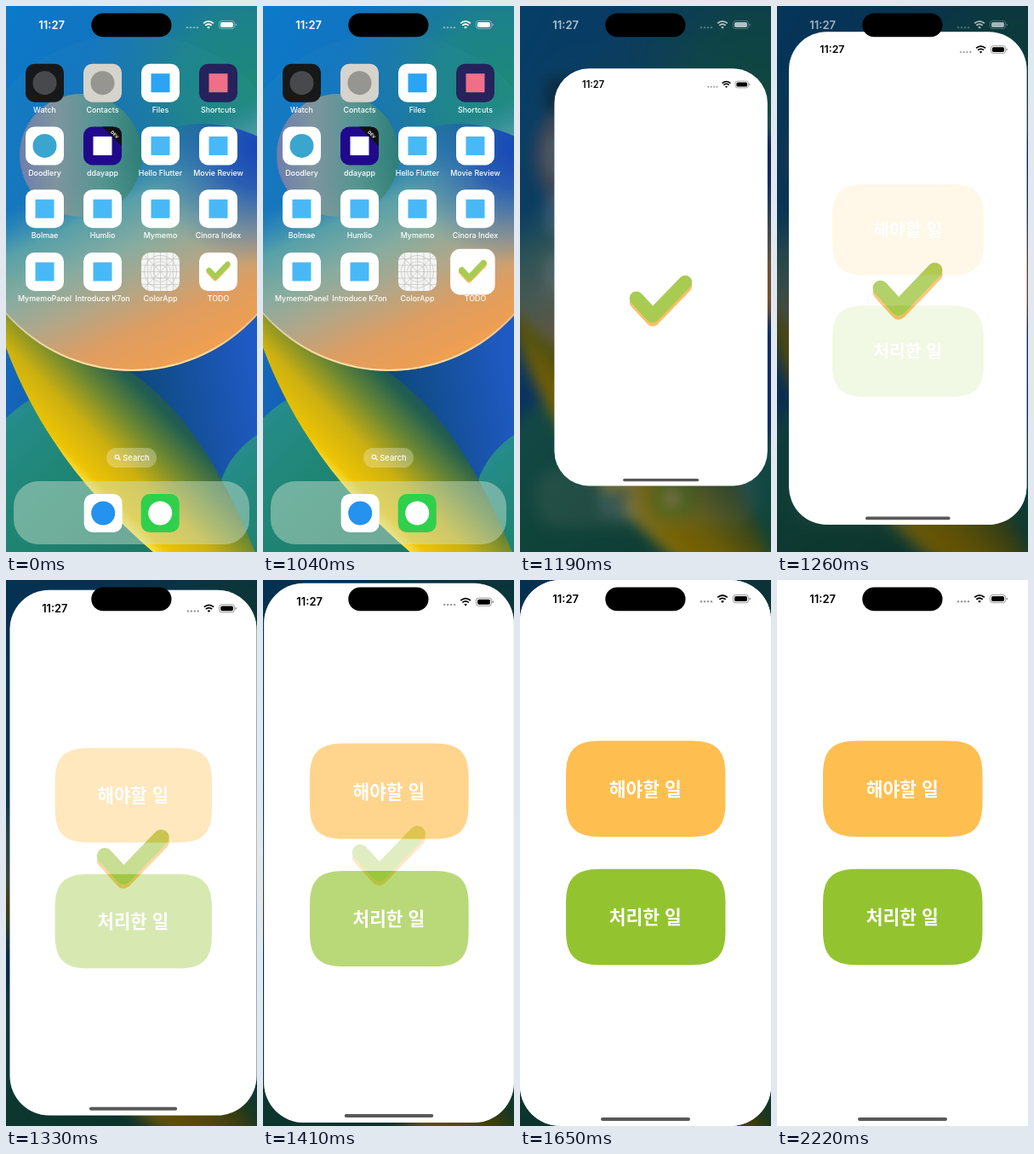
Animation, 295 px wide and 640 px high, one loop 2.44 s. Source, as an HTML page:

```html
<!DOCTYPE html>
<html lang="ko">
<head>
<meta charset="utf-8">
<title>Opening an app</title>
<style>
  html, body { margin: 0; width: 100%; height: 100%; overflow: hidden; background: #000; }
  svg { display: block; width: 100vw; height: 100vh; }
  text { font-family: Inter, sans-serif; text-anchor: middle; }
  .label { font-size: 8.9px; font-weight: 500; fill: #fff; }
  .clock { font-size: 13px; font-weight: 600; fill: currentColor; }
  .button { font: 700 21.5px "Noto Sans CJK KR", "Noto Sans CJK", sans-serif; fill: #fff; }
</style>
</head>
<body>
<svg viewBox="0 0 295 640">
  <defs>
    <linearGradient id="sky" x1="0" y1="0" x2="1" y2="1">
      <stop offset="0" stop-color="#087fd2"/><stop offset=".3" stop-color="#1272bd"/>
      <stop offset=".6" stop-color="#1650b2"/><stop offset="1" stop-color="#0d51b4"/>
    </linearGradient>
    <radialGradient id="moss" gradientUnits="userSpaceOnUse" cx="285" cy="95" r="190">
      <stop offset="0" stop-color="#1d8a79"/><stop offset=".45" stop-color="#1d8783" stop-opacity=".85"/>
      <stop offset="1" stop-color="#1c7fa0" stop-opacity="0"/>
    </radialGradient>
    <linearGradient id="deep" gradientUnits="userSpaceOnUse" x1="160" y1="450" x2="290" y2="425">
      <stop offset="0" stop-color="#0e4a80"/><stop offset="1" stop-color="#1f5ac4"/>
    </linearGradient>
    <linearGradient id="band" gradientUnits="userSpaceOnUse" x1="65" y1="536" x2="170" y2="431">
      <stop offset="0" stop-color="#ffe650"/><stop offset=".1" stop-color="#edc404"/>
      <stop offset=".35" stop-color="#ccb010"/><stop offset=".6" stop-color="#6f8a30"/>
      <stop offset=".85" stop-color="#24604e"/><stop offset="1" stop-color="#174f68"/>
    </linearGradient>
    <linearGradient id="ball" gradientUnits="userSpaceOnUse" x1="90" y1="200" x2="190" y2="420">
      <stop offset="0" stop-color="#3f9ab5" stop-opacity=".1"/><stop offset=".2" stop-color="#5fa6a6" stop-opacity=".9"/>
      <stop offset=".4" stop-color="#86aca0"/><stop offset=".6" stop-color="#b3a687"/>
      <stop offset=".8" stop-color="#df9d60"/><stop offset="1" stop-color="#ee9f52"/>
    </linearGradient>
    <radialGradient id="lens" gradientUnits="userSpaceOnUse" cx="300" cy="165" r="140">
      <stop offset="0" stop-color="#1645b8"/><stop offset=".35" stop-color="#1c50b4" stop-opacity=".85"/>
      <stop offset="1" stop-color="#2a6cb0" stop-opacity="0"/>
    </radialGradient>
    <linearGradient id="rim" x1="0" y1="0" x2="0" y2="1">
      <stop offset=".7" stop-color="#ffe6b0" stop-opacity="0"/><stop offset="1" stop-color="#ffe6b0"/>
    </linearGradient>
    <linearGradient id="core">
      <stop offset="0" stop-color="#7f7fa8"/><stop offset=".3" stop-color="#8f9a98"/>
      <stop offset=".65" stop-color="#5f9a8c"/><stop offset="1" stop-color="#2f7f6c"/>
    </linearGradient>
    <linearGradient id="teal" x1="0" y1="0" x2="1" y2="1">
      <stop offset="0" stop-color="#2b8f98"/><stop offset=".4" stop-color="#1f8675"/><stop offset="1" stop-color="#1c6f5c"/>
    </linearGradient>

    <g id="check" fill="none" stroke-width="19" stroke-linecap="round" stroke-linejoin="round">
      <path d="M113.5 322L136 346.5 181 300" stroke="#fbbf68"/>
      <path d="M113.5 317L136 341.5 181 295" stroke="#a8cb52"/>
    </g>
    <g id="status">
      <text class="clock" x="53.7" y="26.7">11:27</text>
      <g fill="currentColor">
        <g opacity=".4">
          <circle cx="213" cy="25.2" r="1.2"/><circle cx="217" cy="25.2" r="1.2"/>
          <circle cx="221" cy="25.2" r="1.2"/><circle cx="225" cy="25.2" r="1.2"/>
        </g>
        <path d="M236.2 24.8q1.8-1.6 3.6 0L238 26.8z"/>
        <rect x="252" y="19" width="15" height="6" rx="1.8"/>
        <path d="M269.6 20.4q1.5.4 1.5 1.6t-1.5 1.6z" opacity=".45"/>
      </g>
      <g fill="none" stroke="currentColor">
        <path d="M232.2 20.3q5.8-4.8 11.6 0M234.3 22.7q3.7-3 7.4 0" stroke-width="1.8"/>
        <rect x="250.4" y="17.4" width="18.2" height="9.2" rx="3" stroke-width=".9" opacity=".45"/>
      </g>
    </g>
    <path id="card" d="M0 40C0 11 11 0 40 0h107.5c29 0 40 11 40 40v32.5c0 29-11 40-40 40H40C11 112.5 0 101.5 0 72.5z"/>
    <clipPath id="cut"><rect id="frame"/></clipPath>
  </defs>

  <g id="home">
    <g id="wallpaper">
      <rect x="-60" y="-60" width="415" height="760" fill="url(#sky)"/>
      <rect x="-60" y="-60" width="415" height="360" fill="url(#moss)"/>
      <rect x="140" y="340" width="215" height="360" fill="url(#deep)"/>
      <circle cx="350" cy="590" r="103" fill="url(#teal)"/>
      <circle cx="90" cy="570" r="125" fill="url(#teal)"/>
      <path d="M-60 250L60 370 140 425C205 465 262 545 315 700H250C130 615 38 520-10 372z" fill="url(#band)"/>
      <circle cx="148" cy="230" r="198" fill="url(#ball)"/>
      <circle cx="230" cy="290" r="152" fill="url(#lens)"/>
      <circle cx="148" cy="230" r="197" fill="none" stroke="url(#rim)" stroke-width="2"/>
      <circle cx="88" cy="175" r="72" fill="url(#core)" opacity=".85"/>
    </g>
    <g id="icons">
      <rect x="118" y="518" width="59" height="23" rx="11.5" fill="#fff" opacity=".28"/>
      <path d="M132.2 530.2l2.3 2.3" stroke="#fff" stroke-width="1.2"/>
      <circle cx="130.5" cy="528.6" r="2.3" fill="none" stroke="#fff" stroke-width="1.1"/>
      <text class="label" x="153" y="532.8" style="font-size:9.4px">Search</text>
      <rect x="9" y="557" width="277" height="74" rx="29" fill="#cfe3d0" opacity=".46"/>
    </g>
  </g>
  <rect id="dim" width="295" height="640"/>
  <use id="top" href="#status" color="#fff"/>

  <g clip-path="url(#cut)">
    <rect width="295" height="640" fill="#fff"/>
    <use id="badge" href="#check"/>
    <g id="app">
      <use href="#check"/>
      <g id="page">
        <rect width="295" height="640" fill="#fff"/>
        <use href="#card" x="54" y="188.5" fill="#ffbf50"/>
        <use href="#card" x="54" y="338.7" fill="#93c42f"/>
        <text class="button" x="147.3" y="253">해야할 일</text>
        <text class="button" x="147.3" y="403.2">처리한 일</text>
      </g>
      <use href="#status"/>
    </g>
    <rect id="bar" x="95" y="-10" width="105" height="4" rx="2"/>
  </g>
  <rect x="100.3" y="8.5" width="94.2" height="27.8" rx="13.9"/>
</svg>
<script>
const $ = id => document.getElementById(id);
const set = (id, attrs) => { for (const k in attrs) $(id).setAttribute(k, attrs[k]); };

// label, tile colour, mark colour, mark is square
const BLUE = '#48b9f6';
const apps = [
  ['Watch', '#17181a', '#48494c'], ['Contacts', '#d5d3cb', '#97958f'],
  ['Files', '#fff', '#2ba4f3', 1], ['Shortcuts', '#25225c', '#ef6f88', 1],
  ['Doodlery', '#fff', '#3aa5cf'], ['ddayapp', '#21098c', '#fff', 1],
  ['Hello Flutter', '#fff', BLUE, 1], ['Movie Review', '#fff', BLUE, 1],
  ['Bolmae', '#fff', BLUE, 1], ['Humlio', '#fff', BLUE, 1],
  ['Mymemo', '#fff', BLUE, 1], ['Cinora Index', '#fff', BLUE, 1],
  ['MymemoPanel', '#fff', BLUE, 1], ['Introduce K7on', '#fff', BLUE, 1],
  ['ColorApp', '#f4f4f3'], ['TODO']
];
const ribbon = `<path d="M22 0H35Q45 0 45 10V23z" fill="#111"/>
  <text transform="translate(35.5 10.5) rotate(45)" font-size="5" font-weight="700" fill="#fff">DEV</text>`;
const guides = `<g fill="none" stroke="#bdbdbd" stroke-width=".6">
  <path d="M3 3L42 42M42 3L3 42M0 7.5H45M0 15H45M0 22.5H45M0 30H45M0 37.5H45M7.5 0V45M15 0V45M22.5 0V45M30 0V45M37.5 0V45"/>
  <circle cx="22.5" cy="22.5" r="8"/><circle cx="22.5" cy="22.5" r="12"/><circle cx="22.5" cy="22.5" r="19"/></g>`;

function icon(x, y, [label, tile, mark, square], extra = '') {
  let s = '';
  if (tile) s += `<rect width="45" height="45" rx="10.5" fill="${tile}"/>`;
  if (mark) s += square
    ? `<rect x="11.5" y="11.5" width="22" height="22" fill="${mark}"/>`
    : `<circle cx="22.5" cy="22.5" r="14" fill="${mark}"/>`;
  return `<g transform="translate(${x} ${y})">${s}${extra}<text class="label" x="22.5" y="57.3">${label}</text></g>`;
}
const extras = { ddayapp: ribbon, ColorApp: guides };
$('icons').insertAdjacentHTML('beforeend',
  apps.map((a, i) => icon(23 + 68 * (i % 4), 67.7 + 73.75 * (i >> 2), a, extras[a[0]])).join('') +
  icon(91.7, 572, ['', '#fff', '#2492ee']) + icon(158.7, 572, ['', '#2fd04c', '#fff']));

const LOOP = 2440;
const steps = [0, 1040, 1120, 1190, 1260, 1330, 1410, 1490, 1580, 1650, 2220];
const clamp = v => Math.min(1, Math.max(0, v));
const mix = (a, b, p) => a + (b - a) * p;
// critically damped spring from 0 to 1
const spring = (t, start, rate) => {
  const k = Math.max(0, t - start) * rate;
  return 1 - (1 + k) * Math.exp(-k);
};

function draw(t) {
  const p = spring(t, 1026, .0192), q = spring(t, 1029, .0166);
  const x = mix(227, 0, p), y = mix(289, 0, q);
  const w = mix(45, 295, p), h = mix(45, 640, q), s = w / 295;
  const open = clamp((p - .05) / .6);
  const away = clamp((p - .05) / .95);

  set('frame', { x, y, width: w, height: h, rx: t < 2220 ? mix(10.5, 47, p) : 0 });
  set('badge', {
    transform: `translate(${x + w / 2} ${y + h / 2 - .5}) scale(${w * .0072}) translate(-147.2 -321)`,
    opacity: 1 - open
  });
  set('app', { transform: `translate(${x} ${y}) scale(${s})`, opacity: open });
  set('page', { opacity: clamp((t - 1222) / 291) });
  set('bar', { transform: `translate(${x} ${y + h}) scale(${s})`, opacity: .65 * open });
  set('dim', { opacity: .6 * away });
  set('top', { opacity: 1 - .4 * away });
  set('icons', {
    transform: `translate(147.5 320) scale(${1 - .08 * away}) translate(-147.5 -320)`,
    opacity: 1 - .65 * away
  });
  $('home').style.filter = away ? `blur(${10 * away}px)` : 'none';
}

function tick() {
  const t = performance.now() % LOOP;
  draw(steps.findLast(s => s <= t));
  requestAnimationFrame(tick);
}
tick();
</script>
</body>
</html>
```
